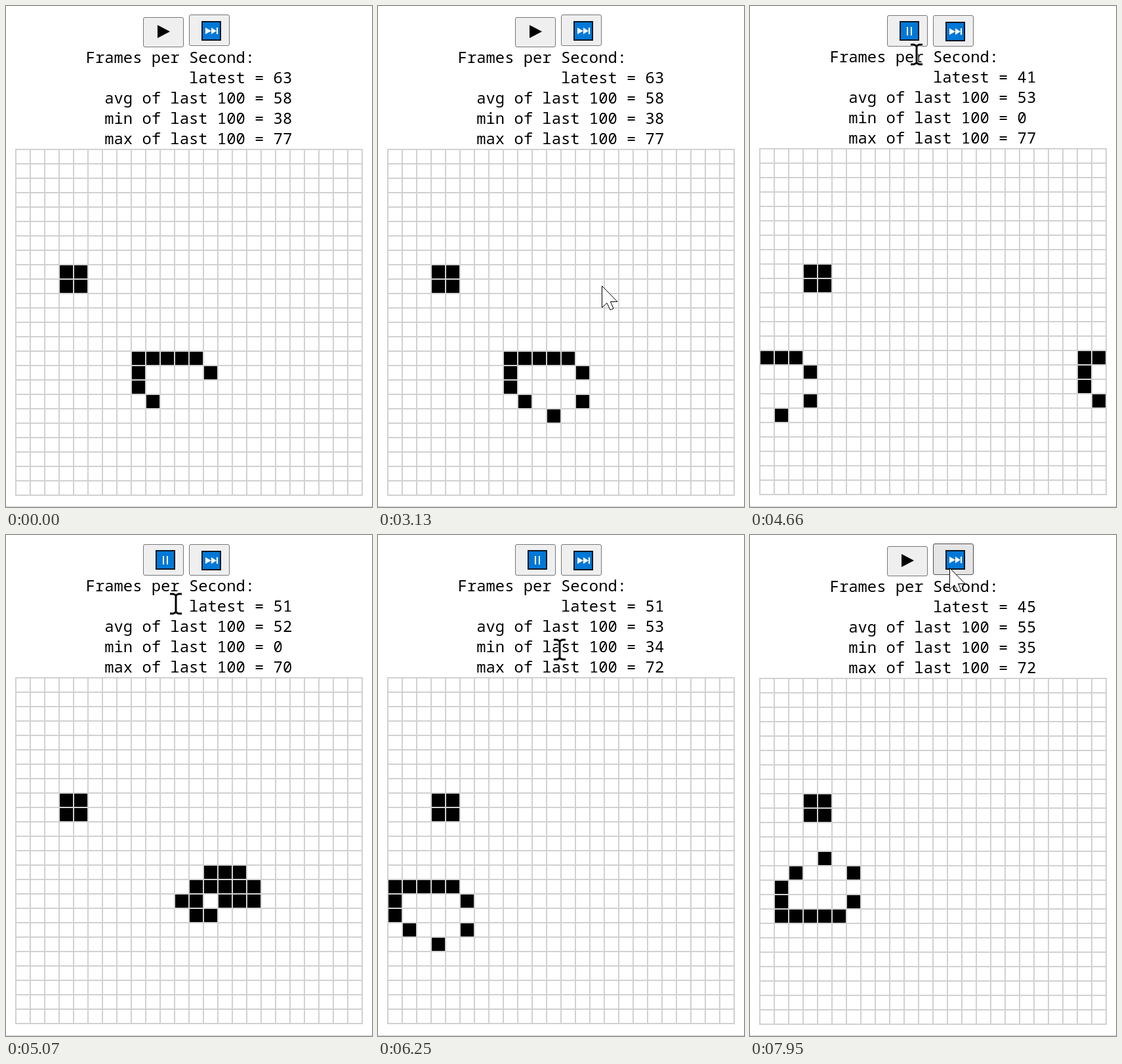
Write an HTML page with a canvas that moves like this. It is 558x765 px and loops after 8 s.

```html
<!DOCTYPE html>
<html lang="en">
<head>
<meta charset="utf-8">
<title>Game of Life</title>
<style>
  html, body { margin: 0; width: 100%; height: 100%; overflow: hidden; background: #fff; }
  #stage { position: relative; width: 558px; height: 765px; overflow: hidden; background: #fff; }
  #stage > * { position: absolute; }
  #board { left: 0; top: 0; }
  #stats {
    left: 121.7px; top: 63px; margin: 0; white-space: pre; color: #000;
    font: 23.83px/31px "Noto Sans Mono", monospace;
  }
  .btn {
    box-sizing: border-box; width: 62px; height: 48px;
    border: 1px solid #767676; border-radius: 3px; background: #efefef;
  }
  .btn.hover { background: #e5e5e5; border-color: #4f4f4f; }
  .btn.down { background: #f5f5f5; border-color: #8d8d8d; }
  .btn svg { position: absolute; overflow: visible; left: 29px; top: 50%; width: 1px; height: 1px; }
  #play { left: 209px; }
  #skip { left: 279px; }
  #rule { left: 0; top: 764px; width: 558px; height: 1px; background: #ccc; }
  #pointer { left: 0; top: 0; overflow: visible; }
</style>
</head>
<body>
<div id="stage">
  <canvas id="board" width="558" height="765"></canvas>
  <pre id="stats"></pre>
  <div id="play" class="btn">
    <svg id="playIcon"><path d="M-8-11V9L11-1Z"/></svg>
    <svg id="pauseIcon">
      <rect x="-10" y="-14" width="28" height="28" fill="#0078d7" stroke="#0b1420" stroke-width="2"/>
      <path d="M1-6V7M7-6V7" stroke="#fff" stroke-width="2"/>
    </svg>
  </div>
  <div id="skip" class="btn">
    <svg>
      <rect x="-10" y="-12" width="28" height="28" fill="#0078d7" stroke="#0b1420" stroke-width="2"
            transform="translate(0 -1)"/>
      <path d="M-5-4V6L4 1ZM4-4V6L12 1ZM12-4h2V6h-2Z" fill="#fff"/>
    </svg>
  </div>
  <div id="rule"></div>
  <svg id="pointer" width="1" height="1">
    <circle id="ring" r="24" fill="#ff0" fill-opacity=".47"/>
    <path id="arrow" d="M.5.5V33.5L8 26.5 13 37 18 35 13.5 24.5H24Z" fill="#fff" stroke="#000"/>
    <g id="beam" fill="none">
      <path id="beamShape" d="M-9-15H-4L0-13 4-15H9M0-13V13M-9 15H-4L0 13 4 15H9" stroke="#fff" stroke-width="5"/>
      <use href="#beamShape" style="display:none"/>
      <path d="M-9-15H-4L0-13 4-15H9M0-13V13M-9 15H-4L0 13 4 15H9" stroke="#000" stroke-width="3"/>
    </g>
  </svg>
</div>
<script>
const LOOP = 8000, N = 24, CELL = 22, LEFT = 15, START = 4200, STOP = 7100, STEP = 30;
const $ = id => document.getElementById(id);
const ctx = $('board').getContext('2d');

// Cells are col + row * N
const at = (c, r) => c + r * N;
const FIRST = at(13, 17), SECOND = at(11, 18);
const seed = new Set([
  at(3, 8), at(4, 8), at(3, 9), at(4, 9),
  ...[8, 9, 10, 11, 12].map(c => at(c, 14)),
  at(8, 15), at(13, 15), at(8, 16), at(9, 17), FIRST, SECOND
]);

function evolve(live) {
  const count = new Map();
  for (const k of live) {
    const c = k % N, r = Math.floor(k / N);
    for (let dr = -1; dr <= 1; dr++) for (let dc = -1; dc <= 1; dc++) {
      if (!dr && !dc) continue;
      const n = at((c + dc + N) % N, (r + dr + N) % N);
      count.set(n, (count.get(n) || 0) + 1);
    }
  }
  const next = new Set();
  for (const [k, n] of count) if (n === 3 || (n === 2 && live.has(k))) next.add(k);
  return next;
}
const gens = [seed];
while (gens.length <= 158) gens.push(evolve(gens[gens.length - 1]));

// time, generation, latest fps, average fps
const run = [
  [START, 0, 0, 57], [4660, 20, 41, 53], [5480, 65, 49, 51], [6250, 112, 51, 53], [STOP, 158, 45, 55]
];

function sim(t) {
  if (t < START) return { gen: 0, fps: [63, 58, 38, 77] };
  if (t >= STOP) return { gen: 158, fps: [45, 55, 35, 72] };
  const i = run.findIndex(k => t < k[0]) - 1;
  const a = run[i], b = run[i + 1];
  const steps = Math.round((b[0] - a[0]) / STEP);
  const s = Math.floor((t - a[0]) / (b[0] - a[0]) * steps), p = s / steps;
  const gen = Math.floor(a[1] + (b[1] - a[1]) * p);
  const noise = Math.abs(Math.sin(gen * 12.9898 + 4) * 43758.5453) % 1;
  return { gen, fps: [
    s ? Math.floor(43 + noise * 24) : a[2],
    Math.round(a[3] + (b[3] - a[3]) * p),
    gen < 101 ? 0 : gen < 140 ? 34 : 35,
    t < 5000 ? 77 : t < 5700 ? 70 : 72
  ] };
}

// Pointer stops: time, x, y
const path = [
  [100, 461, 762], [780, 316, 602], [1260, 316, 602], [1790, 271, 628], [2340, 271, 628],
  [2740, 388, 545], [3130, 341, 427], [3790, 238, 58], [4200, 238, 58], [4660, 254, 74],
  [4980, 258, 90], [5480, 264, 180], [6250, 277, 175], [6630, 262, 91], [6880, 246, 48],
  [7470, 246, 48], [7950, 304, 50], [LOOP, 304, 50]
];
const same = (a, b) => a[1] === b[1] && a[2] === b[2];

function slope(i, d) {
  const a = path[i - 1], p = path[i], b = path[i + 1];
  return !a || !b || same(a, p) || same(p, b) ? 0 : (b[d] - a[d]) / (b[0] - a[0]);
}

function pointerAt(t) {
  let i = 0;
  while (i < path.length - 2 && t >= path[i + 1][0]) i++;
  const a = path[i], b = path[i + 1], h = b[0] - a[0];
  const u = Math.min(1, Math.max(0, (t - a[0]) / h)), v = 1 - u;
  return [1, 2].map(d =>
    a[d] * (1 + 2 * u) * v * v + b[d] * u * u * (3 - 2 * u) +
    h * u * v * (slope(i, d) * v - slope(i + 1, d) * u));
}

const presses = [[980, 1080], [1960, 2110], [4020, START], [6900, STOP]];

function drawBoard(live, top) {
  ctx.clearRect(0, 0, 558, 765);
  ctx.fillStyle = '#d1d1d1';
  for (let i = 0; i <= N; i++) {
    ctx.fillRect(LEFT - 1 + i * CELL, top - 1, 2, N * CELL + 2);
    ctx.fillRect(LEFT - 1, top - 1 + i * CELL, N * CELL + 2, 2);
  }
  ctx.fillStyle = '#000';
  for (const k of live) {
    ctx.fillRect(LEFT + 1 + k % N * CELL, top + 1 + Math.floor(k / N) * CELL, CELL - 2, CELL - 2);
  }
}

const show = (el, on) => { el.style.display = on ? '' : 'none'; };

function render(t) {
  const running = t >= START && t < STOP;
  const { gen, fps } = sim(t);
  const live = new Set(gens[gen]);
  if (t < 1080) live.delete(FIRST);
  if (t < 2110) live.delete(SECOND);
  drawBoard(live, running ? 218 : 219);

  $('stats').textContent = 'Frames per Second:\n' +
    ['latest', 'avg of last 100', 'min of last 100', 'max of last 100']
      .map((label, i) => label.padStart(17) + ' = ' + fps[i]).join('\n');
  $('stats').style.top = (running ? 62 : 63) + 'px';

  const [x, y] = pointerAt(t);
  const pressed = presses.some(([a, b]) => t >= a && t < b);
  const text = y > 62 && y < 218;
  $('pointer').style.transform = `translate(${Math.round(x)}px, ${Math.round(y)}px)`;
  show($('pointer'), t >= 100);
  show($('ring'), pressed);
  show($('arrow'), !text);
  show($('beam'), text);

  const play = $('play'), skip = $('skip');
  play.style.top = (running ? 14 : 17) + 'px';
  play.style.height = (running ? 48 : 46) + 'px';
  skip.style.top = (running ? 14 : 13) + 'px';
  show($('playIcon'), !running);
  show($('pauseIcon'), running);
  for (const [el, left] of [[play, 209], [skip, 279]]) {
    const over = y <= 62 && x >= left && x < left + 62;
    el.classList.toggle('hover', over && !pressed);
    el.classList.toggle('down', over && pressed);
  }
}

const begin = performance.now();
function tick() {
  render((performance.now() - begin) % LOOP);
  requestAnimationFrame(tick);
}
tick();
</script>
</body>
</html>
```
